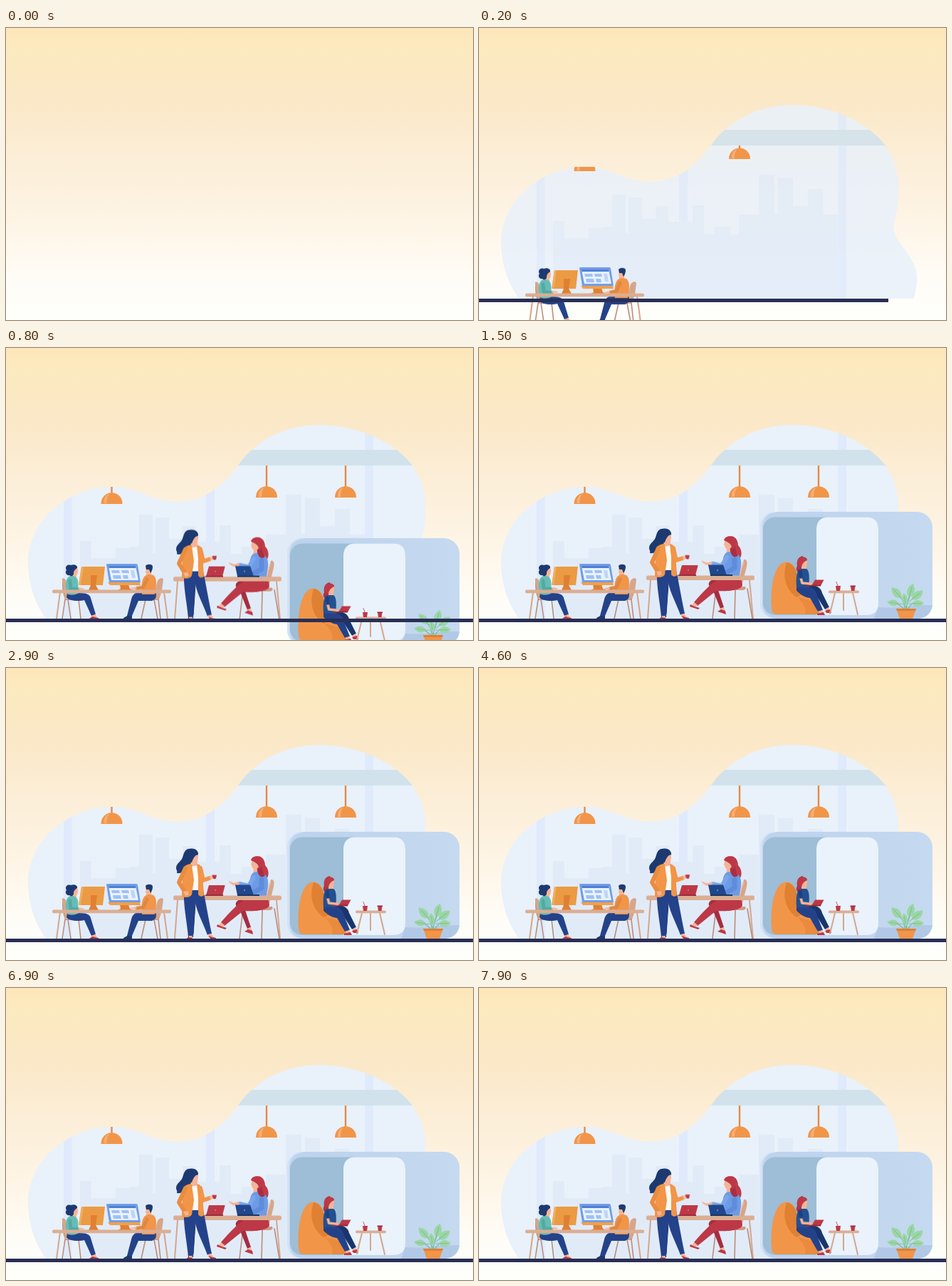
Animation of 656x410 px, one loop 8000 ms. Source, as an HTML page:

```html
<!DOCTYPE html>
<html lang="en">
<head>
<meta charset="utf-8">
<title>Office</title>
<style>
html, body { margin: 0; width: 100%; height: 100%; overflow: hidden; }
body { background: linear-gradient(#fde6b9 0, #fceabf 28px, #fbe8c8 105px, #fcefda 200px, #fef6e9 290px, #fffcf6 345px, #fefefa 400px); }
svg { display: block; width: 656px; height: 410px; }

.navy { fill: #1d3a70; } .pants { fill: #24428a; } .teal { fill: #66bdb6; }
.orange { fill: #f19549; } .deep { fill: #df8033; } .red { fill: #bd3847; }
.skin { fill: #f6b497; } .blue { fill: #6d9be6; } .tan { fill: #dbae92; }
.wood, .wood2, .limb { fill: none; stroke-linecap: round; stroke-linejoin: round; }
.wood { stroke: #d4a68b; stroke-width: 2; }
.wood2 { stroke: #bd8c78; stroke-width: 1.6; }

/* entrances, one 8 s loop */
.show, .line, .rise, .drop { animation: 8s cubic-bezier(.215,.61,.355,1) infinite; }
.show { animation-name: show; }
.line { animation-name: grow; }
.left { animation-name: rise-left; }
.mid { animation-name: rise-mid; }
.pod { animation-name: rise-pod; }
.d1 { animation-name: drop1; }
.d2 { animation-name: drop2; }
.d3 { animation-name: drop3; }
@keyframes show { 0% { opacity: 0; } 5%, 100% { opacity: 1; } }
@keyframes grow { 0% { transform: scaleX(0); } 5%, 100% { transform: none; } }
@keyframes rise-left { 0% { transform: translateY(120px); } 7.5%, 100% { transform: none; } }
@keyframes rise-mid { 0%, 3.75% { transform: translateY(162px); } 11.25%, 100% { transform: none; } }
@keyframes rise-pod { 0%, 7% { transform: translateY(182px); } 14.5%, 100% { transform: none; } }
@keyframes drop1 { 0%, .6% { transform: translateY(-46px); } 8.1%, 100% { transform: none; } }
@keyframes drop2 { 0%, 1.25% { transform: translateY(-46px); } 8.75%, 100% { transform: none; } }
@keyframes drop3 { 0%, 2.5% { transform: translateY(-46px); } 10%, 100% { transform: none; } }

/* small idle gestures */
.sway { animation: sway 1s ease-in-out infinite alternate; }
.slow { animation-duration: 2s; }
@keyframes sway { from { transform: rotate(-1.5deg); } to { transform: rotate(1.5deg); } }
</style>
</head>
<body>
<svg viewBox="0 0 656 410">
  <defs>
    <clipPath id="room"><path d="M56 380C40 358 31 330 31 302C31 240 90 195 148 195C185 195 205 216 240 216C275 216 302 197 326 165C348 132 390 108 440 108C495 108 545 132 571 165C590 192 591 222 588 250C586 270 578 275 586 293C598 315 619 330 615 360L611 380Z"/></clipPath>
    <clipPath id="below1"><path d="M120 195h60v40h-60z"/></clipPath>
    <clipPath id="below2"><path d="M330 165h180v60h-180z"/></clipPath>
    <linearGradient id="side"><stop offset="0" stop-color="#bcd3ec"/><stop offset="1" stop-color="#c5d9f0"/></linearGradient>
    <g id="lamp">
      <path d="M-1.2 -75h2.4V-15h-2.4z" fill="#e58a45"/>
      <path class="orange" d="M-15 0C-15 -21 15 -21 15 0Z"/>
      <path d="M-11 -1C-11 -9 -8 -13 -3 -14C-7 -10 -7 -6 -7 -1Z" fill="#f7b079"/>
    </g>
    <g id="leaf"><path d="M0 0C-7 -5 -7 -13 0 -20C7 -13 7 -5 0 0Z"/><path d="M0 6V-15" fill="none" stroke="#6fb98a" stroke-width=".8"/></g>
  </defs>

  <g class="show">
    <g clip-path="url(#room)">
      <path d="M20 100h610v280H20z" fill="#e9f1fa"/>
      <path d="M81 190h11.5v190H81zM281 190h12v190h-12zM504.500 100h11.500v280h-11.500z" fill="#dfeafc"/>
      <path d="M104 380V271h16v24h34v-14h20v-2h13v-45h19v4h23v30h19v-18h18v22h34v-23h16v40h15v-10h22v11h12v-28h28v-56h22v5h26v39h21v-24h21v36h21v118Z" fill="#e1ebf8"/>
      <path d="M206 238h4v50h-4zM415 211h5v50h-5z" fill="#e9f1fa"/>
      <path d="M300 143h300v22H300z" fill="#d1e2ec"/>
    </g>
  </g>

  <g clip-path="url(#below1)"><g class="drop d1"><use href="#lamp" x="148.500" y="219"/></g></g>
  <g clip-path="url(#below2)">
    <g class="drop d2"><use href="#lamp" x="366" y="210"/></g>
    <g class="drop d3"><use href="#lamp" x="477" y="210"/></g>
  </g>

  <!-- desk with two people -->
  <g class="rise left">
    <path class="wood" d="M76 343L71 380M222 343L227 380"/>
    <path class="wood2" d="M80 326Q79 342 84 353H104M83 353L79 380M102 353L105 380M87 353L91 380"/>
    <path d="M79 326C78 322 82 323 84 326L88 351H83Z" fill="#d6a68b"/>
    <path class="wood2" d="M219 324Q218 342 214 353H193M214 353L217 380M196 353L190 380M208 353L213 380"/>
    <path d="M221 325C219 321 213 324 212 330L207 352H215C219 344 220 334 221 325Z" fill="#d6a68b"/>

    <path class="pants" d="M86 344H105C114 344 118 347 119 351L126 374L120 376L110 354C102 356 87 355 85 350Z"/>
    <path class="skin" d="M120 376L125 374L128 378H121Z"/>
    <path class="red" d="M117 380L121 377L130 379V380Z"/>
    <path class="skin" d="M91 315H99V324H90Z"/>
    <path class="teal" d="M90 320C83 323 83 333 85 345C91 348 98 347 102 344L101 327C100 322 96 319 90 320Z"/>
    <path class="skin" d="M92 309C97 305 102 309 101 314C101 319 97 321 94 319Z"/>
    <path class="navy" d="M100 309C101 305 95 303 91 305C86 303 82 308 85 312C82 315 85 320 89 319C92 322 96 319 95 315C96 312 97 311 100 309Z"/>
    <g class="sway" style="transform-origin:90px 327px">
      <path class="limb" d="M90 327L91 338L102 338.500" stroke="#53aaa5" stroke-width="5"/>
      <path class="skin" d="M102 336L109 337L111 339H102Z"/>
    </g>

    <path d="M106 307H139L136 333H102Z" fill="#eb9b43"/>
    <path d="M106 307H109L105 333H102Z" fill="#f2ad5e"/>
    <path class="deep" d="M119 319H128L126 333L130 340H116L119 333Z"/>

    <path class="deep" d="M160 332H172L174 338L178 340H157L161 338Z"/>
    <path d="M143 329H188L189 333H146Z" fill="#f0a14d"/>
    <path d="M141 304Q141 303 143 303H183Q184.500 303 185 305L189 329H145Z" fill="#719de8"/>
    <path d="M144 306H182L186 326H148Z" fill="#e9f2ff"/>
    <path d="M144 306H182L182.600 309H144.600Z" fill="#4e7fd4"/>
    <path d="M148 312H159L160 316H149ZM162 312H172L173 316H163ZM150 319H161L162 324H151ZM164 319H171L172 324H165Z" fill="#9fc1f4"/>
    <path d="M175 312H180L182 323H177Z" fill="#bdd5f8"/>

    <path class="pants" d="M210 343H186C179 344 177 349 176 353L170 376H177L186 355H205C211 353 212 348 210 343Z"/>
    <path class="navy" d="M170 376H177V380H165C165 378 168 378 170 376Z"/>
    <path class="skin" d="M197 314H204V323H197Z"/>
    <path class="orange" d="M197 319C190 322 190 335 191 346H209C211 337 213 323 207 319Q201 317 197 319Z"/>
    <path class="skin" d="M197 308H204V315C202 318 197 318 196 315Z"/>
    <path class="navy" d="M196 306C198 303 206 303 206 307C206 311 204 315 203 316L201 311H197Z"/>
    <g class="sway" style="transform-origin:199px 326px">
      <path class="limb" d="M198 325L193 336L184 338" stroke="#e08741" stroke-width="5"/>
      <path class="skin" d="M183 336L177 337L174 339H184Z"/>
    </g>
    <rect class="tan" x="65" y="339.500" width="167" height="4.800" rx="2"/>
  </g>

  <!-- high table meeting -->
  <g class="rise mid">
    <path class="wood" d="M241 326L237 380M380 326L385 380"/>
    <path class="wood2" d="M333 338L328 380M360 340L359 380M377 338L384 380"/>
    <path d="M372 297C378 296 377 304 375 311L368 338H358L367 318Z" fill="#d6a68b"/>
    <path class="limb" d="M371 302L363 326" stroke="#ebc3aa" stroke-width="2"/>
    <path d="M329 335H374Q376 339 371 340H331Z" fill="#cd9b83"/>

    <path d="M366 323H338C322 325 318 331 329 341L339 366L344 364L335 337C349 340 365 339 369 334Z" fill="#a52d40"/>
    <path class="red" d="M368 322H341C330 326 316 341 302 357L307 362L333 341C347 342 368 341 370 333Z"/>
    <path class="skin" d="M302 357L307 361L303 365L299 361ZM338 366L344 364L346 370H340Z"/>
    <path class="red" d="M297 360L303 363L310 365L308 367L296 363ZM335 370L340 367L346 369L347 374Z"/>
    <path class="skin" d="M348 279H357V291H347Z"/>
    <path d="M351 265C359 262 364 270 364 277C370 283 370 293 365 297C359 301 352 294 353 285Z" fill="#c03b48"/>
    <path class="blue" d="M348 287C357 284 367 288 368 299C369 306 366 314 366 320H341C343 311 340 291 348 287Z"/>
    <path d="M355 272C361 278 359 284 364 291C359 297 353 291 353 282Z" fill="#a82f42"/>
    <path class="skin" d="M346 269C352 265 357 270 356 276C355 283 348 284 346 280L344 276Z"/>
    <path class="red" d="M344 270C345 264 354 262 359 267C363 272 361 279 355 283C356 275 350 273 344 270Z"/>
    <path class="limb" d="M359 297L359 309L348 315" stroke="#5e8cda" stroke-width="7"/>
    <g class="sway slow" style="transform-origin:345px 296px">
      <path class="limb" d="M348 294L341 306L328 303" stroke="#79a5ec" stroke-width="6"/>
      <path class="skin" d="M328 300L320 302L313 299L314 302L319 305L327 306Z"/>
    </g>

    <rect class="tan" x="235" y="319.500" width="152" height="6.500" rx="2.500"/>
    <path d="M285 305H307Q308 305 307.500 306L304 319H281Z" class="red"/>
    <path d="M281 318H305V320H279Z" fill="#9c2c3d"/>
    <circle cx="294" cy="312" r="1.200" fill="#d8636c"/>
    <path d="M322 304.500H343L348 319H325Z" fill="#20478b"/>
    <path d="M325 318H356V320H325Z" fill="#183768"/>
    <circle cx="335" cy="312" r="1.200" fill="#5f86c4"/>

    <path class="navy" d="M261 254C251 252 250 260 248 266C246 272 239 274 239 281C239 284 241 284 240 288C247 289 254 284 258 279L264 266Z"/>
    <path class="pants" d="M250 312H277C281 330 284 350 289 373L283 375C277 358 269 345 266 330L263 378H256C254 354 249 335 250 312Z"/>
    <path class="limb" d="M266 331L263 373" stroke="#1b3573" stroke-width="1"/>
    <path class="skin" d="M257 376H262L261 380H257ZM283 374L288 373L291 377H286Z"/>
    <path class="red" d="M256 378L262 379V381H252ZM284 376L295 379V381H288Z"/>
    <path class="skin" d="M260 267H269V281H259Z"/>
    <path d="M259 279L270 277L272 311H257Z" fill="#fff9f2"/>
    <path class="orange" d="M259 275C252 276 249 280 248 286L247 321C253 323 259 322 261 318L264 298L261 276Z"/>
    <path class="orange" d="M268 275C274 276 276 280 276 287L278 319C275 322 272 321 270 318L270 294Z"/>
    <path class="limb" d="M252 281L243 301L251 314" stroke="#ea8c40" stroke-width="6"/>
    <path class="skin" d="M249 314L255 313L257 318L252 320Z"/>
    <path class="skin" d="M261 260C265 255 271 259 270 266L269 271C265 274 261 272 260 268Z"/>
    <path class="navy" d="M270 262C271 255 262 251 256 255C251 258 252 266 254 271L261 273C263 267 265 263 270 262Z"/>
    <g class="sway slow" style="transform-origin:273px 283px">
      <path class="limb" d="M273 281L277 298L286 295" stroke="#f19549" stroke-width="6"/>
      <path class="skin" d="M286 292L292 291L294 294L287 297Z"/>
      <path class="red" d="M289.500 290.500H296L295 295.500Q293 297 291 295.500Z"/>
    </g>
  </g>

  <!-- lounge pod -->
  <g class="rise pod">
    <rect x="395" y="230" width="242" height="150" rx="22" fill="url(#side)"/>
    <path d="M417 230H425C405 230 398 239 398 253V358C398 372 405 380 423 380H417C403 380 395 371 395 358V252C395 239 403 230 417 230Z" fill="#d3e3f5"/>
    <path d="M561 364C590 366 612 360 637 361C636 373 627 380 615 380H555Z" fill="#b1c9e6"/>
    <rect x="399" y="237.500" width="162" height="137.500" rx="17" fill="#9dbed6"/>
    <path d="M491 237.500H544Q561 237.500 561 255V358Q561 375 544 375H474V255Q474 237.500 491 237.500Z" fill="#eaf2fb"/>

    <path class="orange" d="M411 366C409 345 412 310 426 302C437 297 445 306 447 320C450 340 466 350 478 360C484 366 481 374 475 374H419Q411 374 411 366Z"/>
    <path class="deep" d="M432 301C441 302 447 311 448 326L456 345L446 350C433 341 427 325 430 309Z"/>
    <path d="M446 349C454 352 469 354 478 361C483 368 480 374 475 374H458C461 363 453 355 446 349Z" fill="#e98a3e"/>

    <path d="M455 292C447 293 446 301 447 306C444 311 447 316 451 315L457 309Z" fill="#b23343"/>
    <path d="M447 333H465C476 333 481 338 482 344L492 364L486 367L474 348C465 348 449 347 446 340Z" fill="#1a356d"/>
    <path class="pants" d="M446 334H460C471 336 474 342 475 348L483 368L476 370L465 351C457 350 446 345 446 334Z"/>
    <path class="skin" d="M476 370L482 368L484 372H478ZM486 367L491 364L493 369H488Z"/>
    <path class="red" d="M475 373L484 371L486 375H475ZM486 369L493 367L495 372H488Z"/>
    <path class="skin" d="M453 304H460V313H453Z"/>
    <path d="M452 310C446 312 445 321 446 336H463C464 326 465 313 460 310Z" fill="#235090"/>
    <path class="skin" d="M453 298C458 294 462 298 461 303C460 309 455 309 453 306Z"/>
    <path class="red" d="M461 298C461 293 453 292 449 296C446 301 449 307 453 308C454 302 457 300 461 298Z"/>
    <path d="M472 325.500H484.500L480 334H467Z" class="red"/>
    <path d="M458 332.500H480V334.500H458Z" fill="#942a3b"/>
    <g class="sway" style="transform-origin:451px 316px">
      <path class="limb" d="M451 319L454 330L466 331" stroke="#f6b497" stroke-width="3.600"/>
      <path class="limb" d="M451 314L452 321" stroke="#1d437f" stroke-width="5.500"/>
    </g>

    <path class="wood" d="M500 344L493 373M525 344L532 374M512 344V368" stroke-width="1.500"/>
    <rect class="tan" x="491" y="340.500" width="43" height="3.800" rx="1.800"/>
    <path class="red" d="M501 334H508L507 341H502ZM522 334H528.500L527.500 341H523Z"/>
    <path class="limb" d="M504 334L502 328.500" stroke="#c55c61" stroke-width="1"/>
    <path d="M521.500 333.500h7.500v1.500h-7.500z" fill="#8f2e3d"/>

    <g fill="none" stroke="#75bd8d" stroke-width="1.200">
      <path d="M599 368C597 357 592 348 587 344M600 368C601 355 605 348 609 342M598 368Q590 358 582 359M601 368Q608 357 617 355"/>
    </g>
    <g fill="#9bd6a5">
      <use href="#leaf" transform="translate(593 351) rotate(-42)"/>
      <use href="#leaf" transform="translate(604 350) rotate(16)"/>
      <use href="#leaf" transform="translate(608 353) rotate(52)"/>
      <use href="#leaf" transform="translate(590 359) rotate(-82) scale(.85)"/>
      <use href="#leaf" transform="translate(608 359) rotate(88) scale(.85)"/>
      <use href="#leaf" transform="translate(599 360) rotate(-8) scale(.8)"/>
    </g>
    <path class="orange" d="M586 366H614L609 380H591Z"/>
    <path class="deep" d="M586 366H614L613 369H587Z"/>
  </g>

  <path class="line" d="M0 380H656V385H0Z" fill="#292f55"/>
</svg>
</body>
</html>
```
